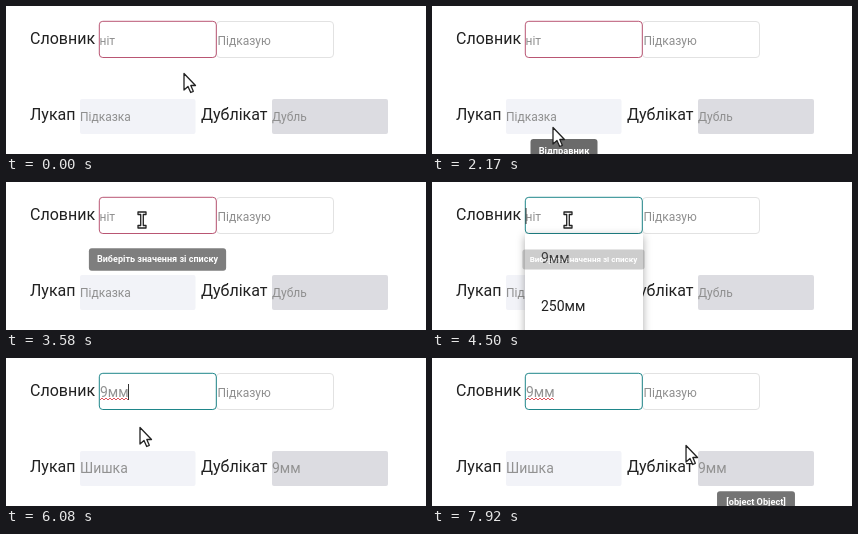
Recreate the animation shown at these times as an HTML page. Size 420x148 px, loop 8 s.

```html
<!DOCTYPE html>
<html lang="uk">
<head>
<meta charset="utf-8">
<style>
  html, body { margin: 0; width: 100%; height: 100%; overflow: hidden; background: #fff; }
  svg { display: block; font-family: Roboto, sans-serif; }
  .label { font-size: 16px; fill: #212121; }
  .hint { font-size: 12px; fill: #8f8f8f; }
  .value { font-size: 14px; fill: #929292; }
  .option { font-size: 14px; fill: #212121; }
  .tip text { font-size: 9.3px; font-weight: 700; fill: #fff; text-anchor: middle; }
  .tip rect { fill: #6b6b6b; }
  #panel { filter: drop-shadow(0 2px 4px #0005); }
  #cursor path { fill: #fff; stroke: #222; stroke-width: 1.3; stroke-linejoin: round; }
</style>
</head>
<body>
<svg width="420" height="148" viewBox="0 0 420 148">
  <rect x="210.5" y="15.5" width="117" height="36" rx="3.5" fill="none" stroke="#e2e2e2"/>
  <rect id="border" x="93.3" y="15.3" width="117" height="36.2" rx="3.5" fill="none"/>
  <rect x="74" y="93" width="115.5" height="35" rx="2" fill="#f2f3f8"/>
  <rect x="266" y="93" width="116" height="35" rx="2" fill="#dcdce1"/>

  <text class="label" x="24" y="38">Словник</text>
  <text class="label" x="24" y="114">Лукап</text>
  <text class="label" x="195" y="114">Дублікат</text>
  <text class="hint" x="211.5" y="39">Підказую</text>

  <g id="empty" class="hint">
    <text x="93.5" y="39">ніт</text>
    <text x="74" y="115">Підказка</text>
    <text x="266" y="115">Дубль</text>
  </g>
  <g id="filled" class="value">
    <text x="94" y="39">9мм</text>
    <text x="74" y="115">Шишка</text>
    <text x="266" y="115">9мм</text>
    <path id="squiggle" fill="none" stroke="#e0525c"/>
  </g>
  <rect id="caret" y="26" width="1" height="16" fill="#333"/>

  <g id="panel">
    <rect x="93" y="52" width="118" height="110" fill="#fff"/>
    <rect id="hover" x="93" width="118" height="48" fill="#f4f4f4"/>
    <text class="option" x="109" y="81">9мм</text>
    <text class="option" x="109" y="129">250мм</text>
  </g>
  <g id="tips"></g>
  <g id="cursor">
    <path id="arrow" d="M0 .5V17L4 13.5L6.7 19.5L9.3 18.3L6.8 12.5H11.5Z"/>
    <path id="beam" d="M-4-8H4V-5.5H1.3V5.5H4V8H-4V5.5H-1.3V-5.5H-4Z"/>
    <path id="hand" d="M-1.5 7V0Q0-2 1.5 0V4L8.5 5Q10.5 5.5 10.5 8L9 13H0L-4.5 8.5Q-4.5 5.5-1.5 7Z"/>
  </g>
</svg>
<script>
const $ = id => document.getElementById(id);
const LOOP = 8000, STEP = 1000 / 12, TRAVEL = 300, OPEN = 4250, PICK = 5640;
$('squiggle').setAttribute('d', 'M94 42' + 'l2-2 2 2'.repeat(7));

// Pointer stops: arrival time, x, y
const stops = [
  [0, 178, 67], [300, 262, 40], [830, 69, 90], [1000, 165, 138], [1400, 70, 80],
  [1700, 121, 121], [2830, 305, 112], [3460, 136, 38], [4800, 227, 80],
  [5250, 134, 55], [6080, 134, 69], [6650, 118, 112], [7250, 322, 118], [7920, 254, 87]
];

const fields = [
  { x: 93, y: 15, w: 117, h: 37, tipY: 77.5, tipW: 141, text: 'Виберіть значення зі списку' },
  { x: 74, y: 93, w: 116, h: 35, tipY: 144.5, tipW: 67, text: 'Відправник' },
  { x: 266, y: 93, w: 116, h: 35, tipY: 144.5, tipW: 79, text: '[object Object]' }
];
for (const f of fields) {
  f.tip = document.createElementNS('http://www.w3.org/2000/svg', 'g');
  f.tip.setAttribute('class', 'tip');
  f.tip.innerHTML = `<rect x="${-f.tipW / 2}" y="-11.5" width="${f.tipW}" height="23" rx="3"/><text y="3">${f.text}</text>`;
  $('tips').append(f.tip);
}

const show = (id, on) => $(id).style.display = on ? '' : 'none';
const isOpen = t => t >= OPEN + 80 && t < PICK;
const inside = ([px, py], { x, y, w, h }) => px > x && px < x + w && py > y && py < y + h;

// Rest at each stop, then ease to arrive at the next one on time
function pointer(t) {
  const i = stops.findLastIndex(s => s[0] <= Math.max(t, 0));
  const [t0, x0, y0] = stops[i], [t1, x1, y1] = stops[i + 1] || [LOOP, x0, y0];
  const travel = Math.min(TRAVEL, t1 - t0);
  const u = Math.max(0, (t - t1) / travel + 1), k = u * u * (3 - 2 * u);
  return [x0 + (x1 - x0) * k, y0 + (y1 - y0) * k];
}

// Share of a recent 150 ms window spent over the field
function tipOpacity(field, t) {
  let hits = 0;
  for (let ago = 80; ago < 230; ago += 10) {
    if (!isOpen(t - ago) && inside(pointer(t - ago), field)) hits++;
  }
  return hits / 15;
}

function draw(t) {
  const at = pointer(t), [x, y] = at;
  const open = isOpen(t), picked = t >= PICK;
  const overPanel = open && inside(at, { x: 93, y: 52, w: 118, h: 96 });
  const overInput = inside(at, { x: 93, y: 15, w: 235, h: 37 });

  $('border').setAttribute('stroke', t < OPEN ? '#b95673' : '#1f868a');
  show('empty', !picked);
  show('filled', picked);
  show('panel', open);
  show('hover', overPanel);
  $('hover').setAttribute('y', y < 100 ? 52 : 100);

  const focused = picked ? t - PICK - 180 : t - OPEN;
  show('caret', t >= OPEN && (focused < 0 || focused % 1200 < 600));
  $('caret').setAttribute('x', picked ? 122 : 93.5);

  for (const f of fields) {
    const o = tipOpacity(f, t);
    f.tip.setAttribute('opacity', o);
    f.tip.setAttribute('transform', `translate(${f.x + f.w / 2} ${f.tipY}) scale(${.8 + .2 * o})`);
  }

  show('hand', overPanel);
  show('beam', overInput);
  show('arrow', !overPanel && !overInput);
  $('cursor').setAttribute('transform', `translate(${x} ${y})`);
}

function tick(now) {
  draw(Math.floor((now % LOOP + 4) / STEP) * STEP % LOOP);
  requestAnimationFrame(tick);
}
tick(performance.now());
</script>
</body>
</html>
```
